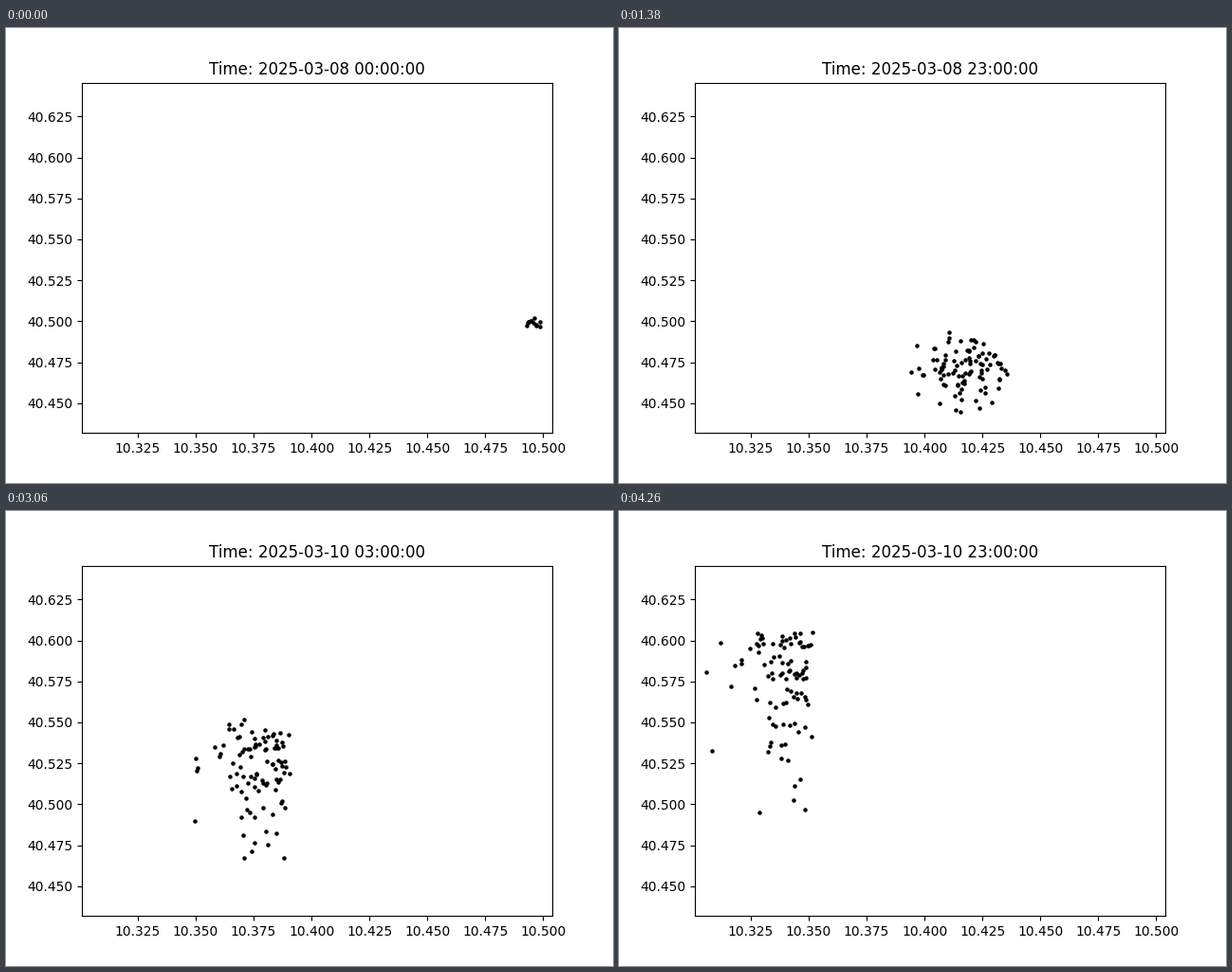
A matplotlib script that plays this animation: 640x480 px, repeating every 4320 ms.

```python
import numpy as np
import matplotlib.pyplot as plt
from matplotlib.animation import FuncAnimation

HOURS, INTERVAL = 72, 60
PER_HOUR, RELEASES = 12, 8
COUNT = PER_HOUR * RELEASES
FORMED = 14  # hour at which the cloud is fully developed
LON, LAT = (10.300916, 10.5039), (40.43177, 40.64567)

rng = np.random.default_rng(8)
hours = np.arange(HOURS)


def to_geo(p):
    """Stage pixels to longitude and latitude."""
    lon = LON[0] + (p[..., 0] - 80) / 496 * (LON[1] - LON[0])
    lat = LAT[1] - (p[..., 1] - 57.6) / 369.6 * (LAT[1] - LAT[0])
    return np.stack([lon, lat], -1)


def smooth(t, knots, values):
    """Cubic Hermite curve through a few key values."""
    k, v = np.array(knots, float), np.array(values, float)
    m = np.gradient(v, k)
    i = np.clip(np.searchsorted(k, t, "right") - 1, 0, len(k) - 2)
    h = k[i + 1] - k[i]
    s = (t - k[i]) / h
    ease = s * s * (3 - 2 * s)
    bend = s * (1 - s) * ((1 - s) * m[i] - s * m[i + 1])
    return v[i] + ease * (v[i + 1] - v[i]) + h * bend


def cloud_paths():
    """Drifting cloud that stretches and grows tails with age."""
    knots = [0, 14, 27, 43, 52, 62, 71]
    x = smooth(hours, knots, [560, 438, 337, 260, 262, 177, 171])
    y = smooth(hours, knots, [312, 344, 358, 283, 272, 230, 183])
    center = np.stack([x, y], -1)[:, None]

    age = (hours - FORMED) / (HOURS - FORMED)
    spread = np.stack([np.full(HOURS, 22.5), 13 + 30 * age], -1)[:, None]

    a, b = rng.normal(size=(2, COUNT, 2))
    turn = 0.9 * age[:, None, None]
    z = np.clip(a * np.cos(turn) + b * np.sin(turn), -2.2, 2.2)
    skew = np.array([-0.3, 0.25]) * np.clip(age, 0, 1)[:, None, None]

    noise = np.zeros((HOURS, COUNT, 2))
    for t in range(1, HOURS):
        noise[t] = 0.9 * noise[t - 1] + rng.normal(0, 1.4, (COUNT, 2))
    return center + spread * (z + skew * (z * z - 1)) + noise


paths = cloud_paths()
paths = paths[:, np.argsort(paths[FORMED, :, 0])]

# The leading particles are released first and drift away from the seed
start = rng.normal((558, 311), (5, 3.5), (COUNT, 2))
release = np.arange(COUNT) // PER_HOUR
for t in range(FORMED):
    u = ((t - release) / (FORMED - release))[:, None]
    paths[t] = start + u * (paths[FORMED] - start)

points = to_geo(paths)

fig, ax = plt.subplots(figsize=(6.4, 4.8), dpi=100)
dots = ax.scatter([], [], s=5, c="black")
ax.set_xlim(*LON)
ax.set_ylim(*LAT)
title = ax.set_title("")


def update(t):
    dots.set_offsets(points[t, release <= t])
    title.set_text(f"Time: 2025-03-{8 + t // 24:02d} {t % 24:02d}:00:00")
    return dots, title


anim = FuncAnimation(fig, update, frames=HOURS, interval=INTERVAL,
                     repeat=True, repeat_delay=0)
plt.show()
```
